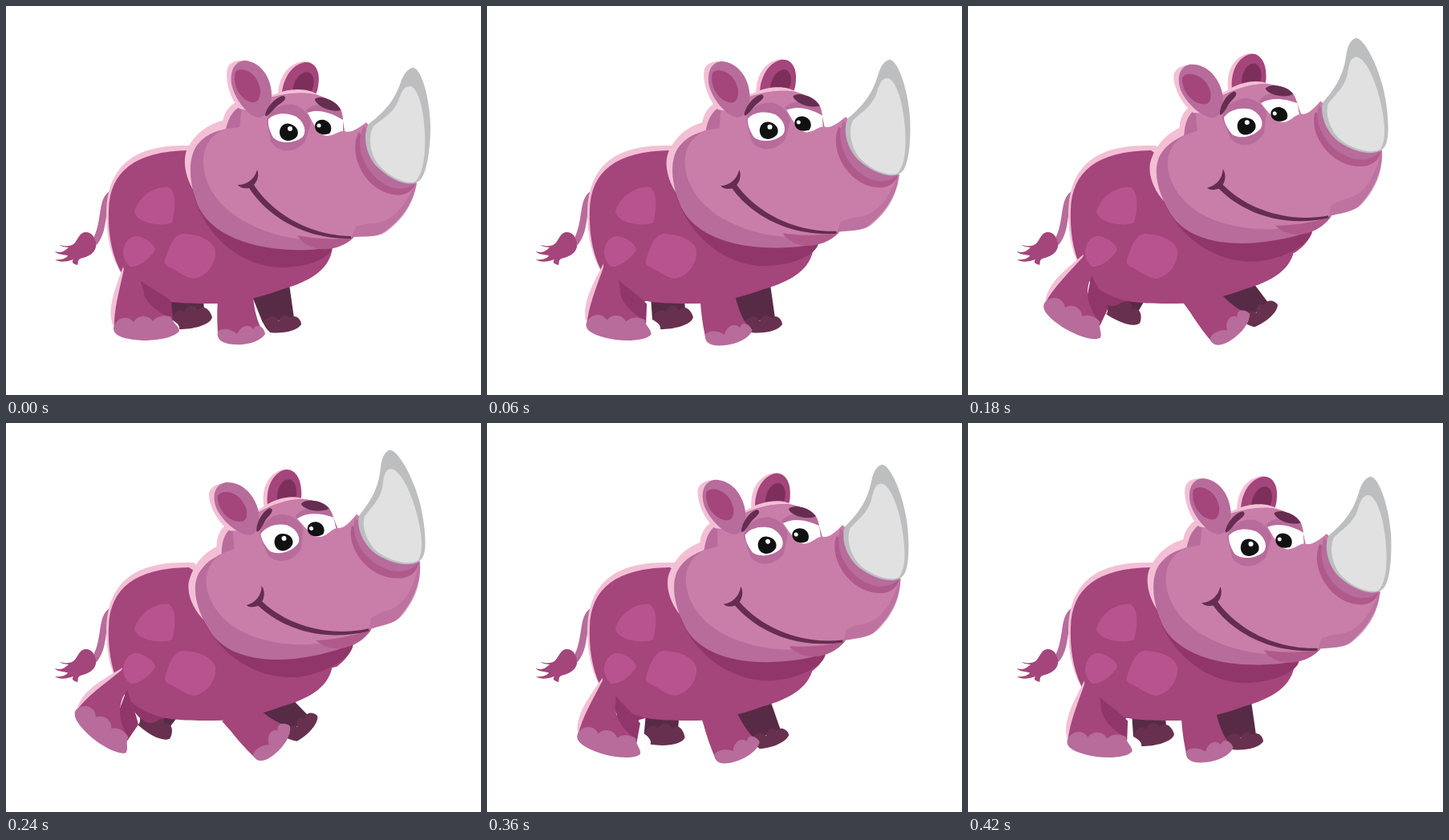
Recreate the animation shown at these times as an HTML page. Size 592 by 485 pixels, loop 480 ms.

```html
<!DOCTYPE html>
<html lang="en">
<head>
<meta charset="utf-8">
<title>Walking rhino</title>
<style>
  html, body { margin: 0; width: 100%; height: 100%; overflow: hidden; background: #fff; }
  svg { display: block; width: 592px; height: 485px; }
  .skin { fill: #a4457b; }
  .spot { fill: #b9538f; }
  .dark { fill: #91366a; }
  .crease { fill: #b05a8c; }
  .mid { fill: #b76c9b; }
  .face { fill: #c97ea9; }
  .rim { fill: #f3bfd5; }
  .far { fill: #572b46; }
  .farFoot { fill: #68304f; }
  .line { fill: #652d50; }
  .white { fill: #fff; }
  .black { fill: #111; }
</style>
</head>
<body>
<svg viewBox="0 0 592 485">
  <!-- tail -->
  <path class="mid" d="M129 231C113 241 121 270 107 293L113 298C126 282 123 262 128 250Z"/>
  <path class="skin" d="M98 282C107 281 110 288 112 295C114 305 105 312 96 314C87 316 91 320 89 323C82 321 82 319 84 316C76 319 66 320 61 316C70 317 76 314 77 311C67 310 62 308 61 306C71 309 74 304 78 301C72 300 69 300 67 298C75 300 82 300 86 295C90 290 92 283 98 282Z"/>

  <!-- far legs -->
  <g id="farBack">
    <path class="far" d="M203 345H244L247 378L222 390L206 391Z"/>
    <path class="farFoot" d="M206 391C209 381 217 376 222 382C226 372 235 371 239 380C244 371 254 377 257 388C255 397 235 403 216 403C217 398 212 394 206 391Z"/>
  </g>
  <g id="farFront">
    <path class="far" d="M311 340H352L359 389L320 395L308 365Z"/>
    <path class="farFoot" d="M320 394C326 387 336 384 340 393C344 383 351 384 354 390C359 383 368 390 368 397C363 405 345 409 329 407C325 403 322 399 320 394Z"/>
  </g>

  <!-- body -->
  <path class="dark" d="M150 335L205 366L190 370C183 377 172 376 160 360Z"/>
  <path class="rim" d="M145 335C130 313 125 285 125 257C126 207 152 175 218 174L234 174L250 190L160 335Z"/>
  <path class="skin" d="M145 335C132 312 127 285 128 255C129 206 161 181 228 180L330 250L407 300C405 328 378 344 345 353C315 364 285 371 260 371C238 371 222 371 205 369C178 364 158 354 145 335Z"/>

  <!-- near legs -->
  <g id="nearBack">
    <path class="rim" d="M146 325C136 353 124 380 135 402L152 350Z"/>
    <path class="dark" d="M167 342C180 352 196 359 206 368L208 392L185 395Z"/>
    <path class="skin" d="M147 328C141 356 134 380 135 402L180 403L206 389C184 379 171 368 168 345L174 314Z"/>
    <path class="mid" d="M134 402C136 389 151 384 159 394C165 384 178 385 183 393C190 384 202 386 206 388C207 395 216 399 216 405C211 413 190 417 172 417C150 416 134 412 134 402Z"/>
  </g>
  <g id="nearFront">
    <path class="skin" d="M264 348H307C308 372 311 388 318 402L290 412L264 408C263 392 263 380 264 365Z"/>
    <path class="mid" d="M264 406C269 400 282 403 288 409C293 397 304 396 308 403C313 394 322 401 323 409C317 418 302 423 284 422C270 421 262 416 264 406Z"/>
  </g>

  <!-- spots -->
  <g class="spot">
    <path d="M160 257C164 239 184 224 203 226C212 232 212 252 207 270C198 275 165 273 160 257Z"/>
    <path d="M146 306C147 294 155 286 163 287C174 288 186 298 186 304C180 315 165 326 155 325C149 321 146 313 146 306Z"/>
    <path d="M198 317C202 304 208 285 220 284C238 284 260 292 261 306C262 322 250 337 234 340C222 338 212 329 205 326C199 324 197 321 198 317Z"/>
  </g>

  <g id="head">
    <!-- chest and its shadow -->
    <path class="skin" d="M330 290L407 300C403 310 394 318 380 324L340 322Z"/>
    <path class="dark" d="M230 215C237 278 288 326 345 326C384 325 407 311 407 299L330 260Z"/>
    <!-- right ear -->
    <g transform="translate(-2 1)">
      <path class="rim" d="M341 107C343 85 355 69 375 68L384 75L360 110Z"/>
      <path class="skin" d="M346 106C349 85 361 70 377 69C390 70 394 85 391 99C390 107 387 112 383 114Z"/>
      <path d="M359 106C360 90 371 79 380 82C388 86 387 102 379 110Z" fill="#7d2f5c"/>
    </g>
    <!-- skull -->
    <path class="rim" d="M235 232C222 212 219 188 228 174C238 157 253 147 270 143C274 127 284 118 300 116L335 110C355 101 380 102 392 113L300 170Z"/>
    <path class="mid" d="M236 240C226 210 228 181 243 168C255 157 265 156 274 153C278 137 285 126 300 122L330 114C360 106 385 107 400 116C416 121 420 131 420 143L440 275L433 289C410 303 385 305 358 304C296 302 247 280 236 240Z"/>
    <path class="face" d="M294 128L335 113C360 107 385 107 400 116C414 121 419 131 420 142L420 155C428 160 437 154 449 145L512 221C508 245 492 268 468 284C458 288 444 287 429 288C395 296 345 293 306 273C265 254 244 221 246 189C248 170 259 158 275 153L291 151Z"/>
    <path class="mid" d="M436 275C443 273 449 271 455 271C482 271 498 248 511 221C509 246 494 267 473 282C462 289 446 287 431 288Z" opacity=".65"/>
    <!-- left ear -->
    <g transform="translate(-2 2)">
      <path class="rim" d="M293 126C279 112 274 84 279 73C285 65 295 65 305 67L312 130Z"/>
      <path class="mid" d="M300 66C321 68 334 90 333 112C332 128 325 137 316 137C301 134 286 111 283 95C281 80 286 67 300 66Z"/>
      <path class="skin" d="M288 80C296 72 318 82 319 105C318 118 312 120 305 117C292 112 284 95 288 80Z"/>
    </g>
    <!-- eyes -->
    <path class="mid" d="M325 142C330 128 343 121 359 123C371 127 379 137 380 147L372 170C361 183 340 185 330 169Z"/>
    <path class="mid" d="M373 131C381 121 403 121 417 128L420 143Z"/>
    <path class="white" d="M327 141C335 133 350 132 362 138C373 146 375 158 369 164C356 173 340 171 333 164C329 157 326 148 327 141Z"/>
    <path class="white" d="M376 133C391 127 409 135 420 142L420 156C414 156 410 161 400 162C390 161 383 147 376 133Z"/>
    <path class="black" d="M341 158C341 149 348 145 354 147C361 149 366 155 363 162C358 170 342 171 341 158Z"/>
    <path class="black" d="M385 150C385 143 393 140 399 143C406 146 407 155 403 159C396 162 385 159 385 150Z"/>
    <circle class="white" cx="354" cy="153" r="3"/>
    <circle class="white" cx="390" cy="149" r="2.5"/>
    <path class="line" d="M323 137C323 129 335 113 346 112C351 115 346 119 340 123C333 128 328 138 323 137Z"/>
    <path class="line" d="M385 116C393 110 413 119 417 130C412 132 399 130 391 124C387 121 385 118 385 116Z"/>
    <!-- mouth -->
    <path class="crease" d="M363 286C378 309 413 308 433 289C405 292 385 290 363 286Z"/>
    <path class="line" d="M289 223C300 223 310 216 313 204C316 211 313 219 309 223C330 256 375 286 430 287V290C370 291 325 261 303 227C296 228 291 226 289 223Z"/>
    <!-- snout and horn -->
    <path class="crease" d="M440 157C425 184 447 229 482 235C495 238 506 232 510 222L480 216L449 170Z"/>
    <path class="mid" d="M446 149C430 180 455 221 485 227C497 229 506 225 511 220L480 210Z"/>
    <path fill="#bdbec0" d="M507 77C516 76 528 110 529 150C529 180 524 210 516 217C505 228 480 218 462 200C448 185 444 160 452 147C475 130 485 115 492 95C496 84 501 78 507 77Z"/>
    <path fill="#e1e1e2" d="M503 100C512 100 521 125 522 160C523 190 519 210 510 219C500 223 475 213 462 195C452 178 452 160 458 150C470 140 485 132 490 115C494 105 497 100 503 100Z"/>
  </g>
</svg>
<script>
  const STEP = 60, STEPS = 8;
  // Pivot and the angle at each step of the forward half; the way back mirrors it.
  const joints = {
    head:      { pivot: [312, 180], angles: [0, -3, -7.6, -11.5, -13.6] },
    nearBack:  { pivot: [174, 314], angles: [0, 7, 15, 30, 39] },
    nearFront: { pivot: [298, 353], angles: [0, -8, -19, -36, -42] },
    farBack:   { pivot: [224, 324], angles: [0, 0, 9, 35, 43] },
    farFront:  { pivot: [330, 350], angles: [0, 0, -11, -29, -36] }
  };

  function draw(time) {
    const step = Math.floor(time / STEP) % STEPS;
    const pose = Math.min(step, STEPS - step);
    for (const [id, { pivot, angles }] of Object.entries(joints)) {
      document.getElementById(id).setAttribute('transform', `rotate(${angles[pose]} ${pivot})`);
    }
  }

  let start;
  function tick(now) {
    start ??= now;
    draw(now - start);
    requestAnimationFrame(tick);
  }
  draw(0);
  requestAnimationFrame(tick);
</script>
</body>
</html>
```
